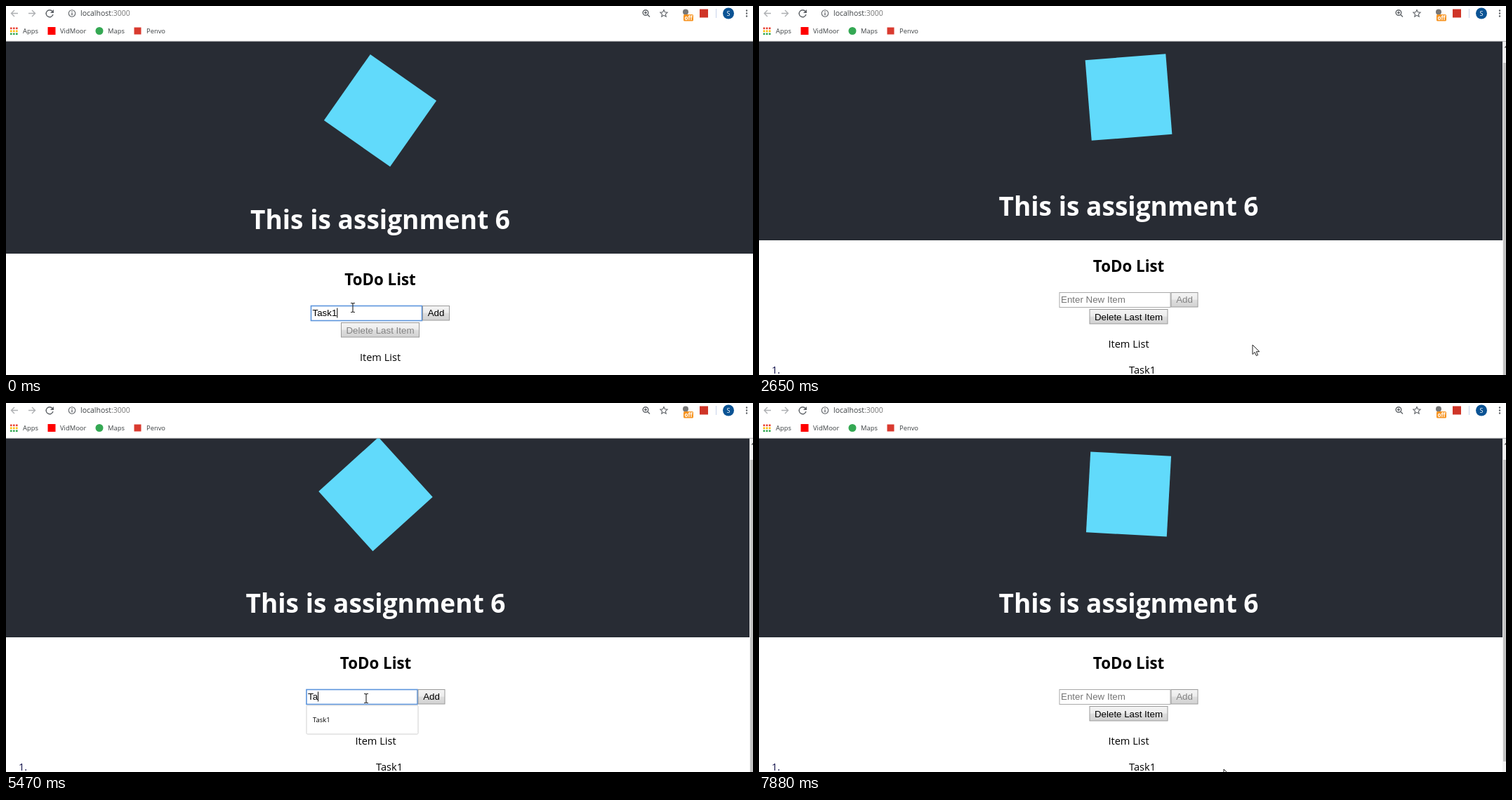
Recreate the animation shown at these times as an HTML page. Size 1064 px wide and 526 px high, loop 8000 ms.

```html
<!DOCTYPE html>
<html lang="en">
<head>
<meta charset="utf-8">
<title>ToDo List</title>
<style>
  html, body { margin: 0; width: 100%; height: 100%; overflow: hidden; background: #fff; }
  svg { display: block; width: 1064px; height: 526px; }
  text { font: 14.6px "Open Sans", "Noto Sans", sans-serif; white-space: pre; }
  .mid { text-anchor: middle; }
  .bar text { font-size: 9.4px; fill: #3c4043; }
  .bar .url { font-size: 10.5px; }
  .form text { font: 13.333px "Liberation Sans", Arial, sans-serif; }
  .menu text { font-size: 9.5px; }
  .button rect { fill: url(#face); stroke: #9a9a9a; }
  .off text { fill: #838383; }
  .line { fill: none; stroke: #5f6368; stroke-width: 1.4; }
</style>
</head>
<body>
<svg viewBox="0 0 1064 526">
  <defs>
    <linearGradient id="face" x2="0" y2="1">
      <stop offset="0" stop-color="#f4f4f4"/>
      <stop offset=".48" stop-color="#ececec"/>
      <stop offset=".5" stop-color="#dedede"/>
      <stop offset="1" stop-color="#d2d2d2"/>
    </linearGradient>
    <clipPath id="view"><path d="M0 50.5H1064V526H0z"/></clipPath>
  </defs>

  <g class="bar">
    <path class="line" stroke-opacity=".5" d="M17 10.5H7.500M12 6l-4.500 4.500 4.500 4.500M32 10.500h9.500M37 6l4.500 4.500-4.500 4.500"/>
    <path class="line" d="M66 7.500a5 5 0 1 0 1 4.500"/>
    <path fill="#5f6368" d="M68 5v5h-5z"/>
    <circle class="line" cx="94" cy="10.500" r="4.700" style="stroke-width:1.1"/>
    <path class="line" d="M94 7.500v1.300M94 9.800v3.500"/>
    <text class="url" x="106" y="14">localhost<tspan fill="#777">:3000</tspan></text>
    <circle class="line" cx="911" cy="9.500" r="3.800"/>
    <path class="line" d="M914 12.500l3 3M909 9.500h4M911 7.500v4"/>
    <path class="line" style="stroke-width:1.1" d="M937 5.500l1.500 3.300 3.600.4-2.700 2.400.8 3.500-3.200-1.800-3.200 1.800.8-3.500-2.700-2.400 3.600-.4z"/>
    <circle cx="968" cy="8.500" r="4" fill="#777"/>
    <rect x="965" y="12" width="14" height="9.500" rx="1.500" fill="#f79421"/>
    <text class="mid" x="972" y="20" style="font-size:8px;font-weight:700;fill:#fff">off</text>
    <rect x="988" y="4.500" width="12" height="12" fill="#cf3528"/>
    <path d="M1011.500 4v13" stroke="#c9d3ea"/>
    <circle cx="1029" cy="10.500" r="8" fill="#0b5394"/>
    <text class="mid" x="1029" y="13.700" style="fill:#fff;font-size:9px">S</text>
    <path d="M1055 6.500h.01M1055 10.500h.01M1055 14.500h.01" stroke="#5f6368" stroke-width="2.400" stroke-linecap="round"/>
    <g id="apps"></g>
    <text x="24" y="38.500">Apps</text>
    <rect x="59.500" y="30" width="11" height="11" fill="#f00"/>
    <text x="77" y="38.500">VidMoor</text>
    <circle cx="133" cy="35.500" r="5.500" fill="#34a853"/>
    <text x="145" y="38.500">Maps</text>
    <rect x="182.500" y="30.500" width="10" height="10" fill="#d93a2f"/>
    <text x="200" y="38.500">Penvo</text>
    <path d="M0 50h1064" stroke="#dcdcdc"/>
  </g>

  <g clip-path="url(#view)">
    <g id="scroll">
      <path fill="#282c34" d="M0 50H1064V353H0z"/>
      <g id="page">
        <rect id="spin" x="-57.500" y="-57.500" width="115" height="115" fill="#61dafb"/>
        <text class="mid" x="533" y="318" style="font-size:37.1px;font-weight:700" fill="#fff">This is assignment 6</text>
        <text class="mid" x="533" y="398" style="font-size:22.3px;font-weight:700">ToDo List</text>
        <text class="mid" x="533" y="505.500">Item List</text>
        <text class="mid" id="task" x="552.500" y="543">Task1</text>
        <g class="form">
          <rect id="box" x="434.500" y="427.500" width="158" height="21" fill="#fff"/>
          <text id="entry" x="436.500" y="442"></text>
          <path id="caret" stroke="#000" d="M0 430.500v14"/>
          <g id="add" class="button">
            <rect x="593.500" y="427.500" width="38" height="20.500"/>
            <text class="mid" x="612.500" y="442">Add</text>
          </g>
          <g id="del" class="button">
            <rect x="477.500" y="451.500" width="111" height="20.500"/>
            <text class="mid" x="533" y="466.500">Delete Last Item</text>
          </g>
        </g>
        <g class="menu" id="menu">
          <rect id="panel" x="434.500" y="450" width="159" rx="1.500" fill="#fff" stroke="#d0d0d0"/>
          <text x="443.500" y="474"></text>
          <text x="443.500" y="502.500"></text>
          <text x="443.500" y="531"></text>
        </g>
      </g>
      <text id="num" x="18" y="543" fill="#10104a">1.</text>
    </g>
    <g id="bar">
      <path fill="#f1f1f1" d="M1059 50h5v476h-5z"/>
      <path fill="#505050" d="M1061.500 59.500l2.500-3v3z"/>
      <rect id="thumb" x="1060" width="4" fill="#c1c1c1"/>
    </g>
  </g>

  <path id="arrow" d="M0 0v13.500l3.200-3 2.200 5 2.200-1-2.200-4.800h4.400z" fill="#fff" stroke="#222"/>
  <path id="beam" d="M-3-6.500h2l1 1 1-1h2M0-5.500v11M-3 6.500h2l1-1 1 1h2" fill="none" stroke="#333" stroke-width="1.200"/>
</svg>
<script>
const LOOP = 8000, ADD1 = 1300, FOCUS = 4470, ADD2 = 7230;
const $ = id => document.getElementById(id);
const set = (id, attrs) => { for (const k in attrs) $(id).setAttribute(k, attrs[k]); };
const show = (id, on) => { $(id).style.display = on ? "" : "none"; };

// Bursts of repaints: first, last, count
const bursts = [[0, 0, 1], [120, 1060, 8], [1180, 2140, 8], [2260, 3250, 8], [3380, 4340, 8],
  [4470, 5470, 8], [5620, 6530, 8], [6680, 7640, 8], [7760, 7880, 2]];
// Pointer path: time, x, y
const path = [[0, 494, 430], [120, 500, 430], [650, 648, 433], [1060, 617, 435.5], [1750, 617, 435.5],
  [2260, 703, 483], [3380, 703, 483], [4250, 513, 421], [6550, 513, 421], [6950, 625, 425],
  [7130, 612, 421], [7330, 612, 421], [7880, 662, 522]];
const keys = [[5200, "T"], [5450, "Ta"], [5740, "Tas"], [6000, "Task"], [6270, "Task2"]];

const dots = ["#ea4335", "#fbbc05", "#34a853", "#4285f4"];
for (let i = 0; i < 9; i++) {
  const x = 6 + i % 3 * 4, y = 30.5 + Math.floor(i / 3) * 4;
  $("apps").innerHTML += `<rect x="${x}" y="${y}" width="2.6" height="2.6" fill="${dots[(i * 3 + i % 3) % 4]}"/>`;
}

function repaintTime(t) {
  const [from, to, n] = bursts.findLast(b => b[0] <= t);
  if (n < 2) return from;
  const step = (to - from) / (n - 1);
  return from + step * Math.min(n - 1, Math.floor((t - from) / step + 0.3));
}

function pointer(t) {
  const i = path.findIndex(p => p[0] > t);
  if (i < 0) return path.at(-1).slice(1);
  const [a, b] = [path[i - 1], path[i]];
  const u = (t - a[0]) / (b[0] - a[0]), e = u * u * (3 - 2 * u);
  return [a[1] + (b[1] - a[1]) * e, a[2] + (b[2] - a[2]) * e];
}

function draw(t) {
  const added = t >= ADD1, dx = added ? -6.5 : 0;
  const roll = Math.min(1, Math.max(0, (t - 2260) / 240)), dy = -19 * roll;
  const focus = t < ADD1 || (t >= FOCUS && t < ADD2);
  const key = keys.findLast(k => k[0] <= t);
  const value = t < ADD1 ? "Task1" : focus && key ? key[1] : "";

  set("scroll", { transform: `translate(0 ${dy})` });
  set("page", { transform: `translate(${dx} 0)` });
  set("spin", { transform: `translate(533 149) rotate(${35 + 0.0188 * t})` });
  show("task", added);
  show("num", added);
  show("bar", added);
  set("thumb", { y: 64 + 17 * roll, height: t < ADD2 ? 449 : 430 });

  $("entry").textContent = value || "Enter New Item";
  set("entry", { fill: value ? "#000" : "#757575" });
  set("box", { stroke: focus ? "#5b94dc" : "#a9a9a9", "stroke-width": focus ? 1.6 : 1 });
  const since = t < ADD1 ? 0 : key ? key[0] : FOCUS;
  show("caret", focus && Math.floor((t - since) / 530) % 2 === 0);
  const width = value ? $("entry").getComputedTextLength() : 0;
  set("caret", { transform: `translate(${437 + width} 0)` });
  set("add", { class: value ? "button" : "button off" });
  set("del", { class: added ? "button" : "button off" });

  const hints = value ? ["Task1"] : ["asas", "asaas", "Task1"];
  show("menu", t >= FOCUS && t < keys.at(-1)[0]);
  set("panel", { height: value ? 41 : 100 });
  document.querySelectorAll("#menu text").forEach((el, i) => { el.textContent = hints[i] || ""; });

  const [x, y] = pointer(t);
  const over = x > 434 + dx && x < 593 + dx && y > 427 + dy && y < 449 + dy;
  show("beam", over);
  show("arrow", !over);
  set(over ? "beam" : "arrow", { transform: `translate(${x} ${y})` });
}

const start = performance.now();
function tick() {
  draw(repaintTime((performance.now() - start) % LOOP));
  requestAnimationFrame(tick);
}
tick();
</script>
</body>
</html>
```
